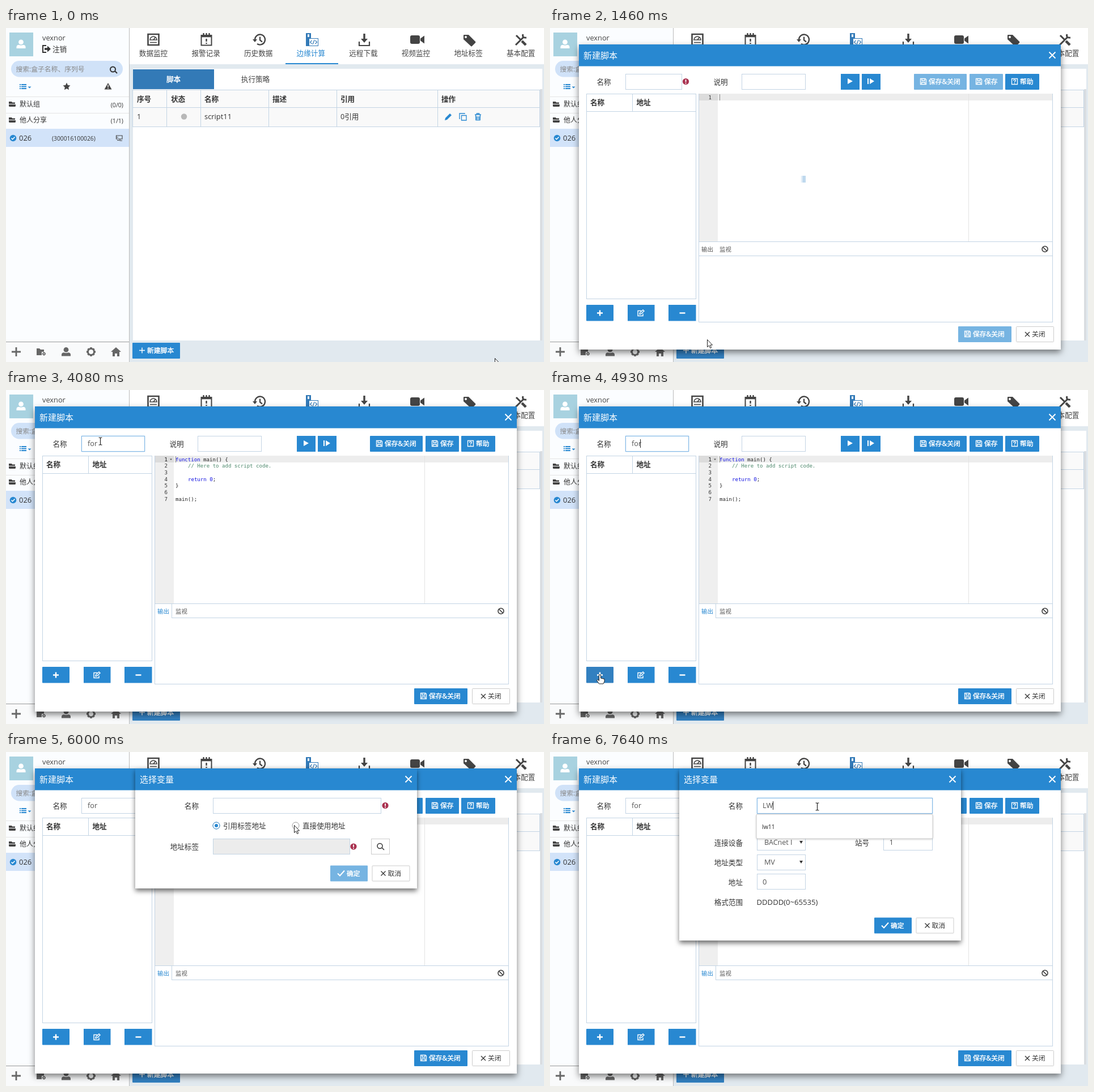
Write an HTML page that moves like this. It is 949x590 px and loops after 8 s.

```html
<!DOCTYPE html>
<html lang="zh-CN">
<head>
<meta charset="utf-8">
<title>新建脚本</title>
<style>
html, body { margin: 0; width: 100%; height: 100%; overflow: hidden; background: #fff; }
svg { display: block; font-family: "Open Sans", "Noto Sans CJK SC", "Noto Sans CJK", "Noto Sans", sans-serif; }
.mono { font-family: "DejaVu Sans Mono", monospace; }
.mid { text-anchor: middle; }
.end { text-anchor: end; }
.bold { font-weight: 700; }
.heavy { stroke: #fff; stroke-width: .4; }
</style>
</head>
<body>
<svg id="stage" width="949" height="590" viewBox="0 0 949 590"></svg>
<script>
const BLUE = '#2888d1', PALE = '#76b4e2', DARK = '#3280c0', EDGE = '#c3d4e4', INK = '#333', ICON = '#444';
const stage = document.getElementById('stage');

// Drawing helpers; each returns markup
const text = (x, y, s, fill = INK, size = 12.6, cls = '', id = '') =>
  `<text x="${x}" y="${y}" fill="${fill}" font-size="${size}" class="${cls}" id="${id}">${s}</text>`;
const rect = (x, y, w, h, fill, id = '', more = '') =>
  `<rect x="${x}" y="${y}" width="${w}" height="${h}" fill="${fill}" id="${id}" ${more}/>`;
const box = (x, y, w, h, fill = '#fff', line = EDGE, id = '', r = 0) =>
  rect(x + .5, y + .5, w - 1, h - 1, fill, id, `stroke="${line}" rx="${r}"`);
const path = (x, y, d, fill = 'none', line = 'none', w = 1.5) =>
  `<path transform="translate(${x} ${y})" d="${d}" fill="${fill}" stroke="${line}" stroke-width="${w}"/>`;
const stroke = (x, y, d, line = ICON, w = 1.5) => path(x, y, d, 'none', line, w);
const group = (id, body) => `<g id="${id}">${body}</g>`;
const disc = (x, y, r, fill) => `<circle cx="${x}" cy="${y}" r="${r}" fill="${fill}"/>`;

const CROSS = 'M-4-4L4 4M4-4L-4 4', PLUS = 'M-5 0H5M0-5V5', MINUS = 'M-5 0H5', CHECK = 'M-6 0L-2 4L6-5';
const LENS = 'M3 3L7 7M4 0A4.5 4.5 0 1 1-5 0A4.5 4.5 0 1 1 4 0';
const DISK = 'M-5-5H3.5L5-3.5V5H-5ZM-2.5-5V-1.5H2.5V-5M-3 5V1.5H3V5';
const PERSON = 'M0-8A4.3 4.3 0 0 1 0 .8A4.3 4.3 0 0 1 0-8M-8 7.5V5Q-8 1.5-3.5 1.2Q0 3 3.5 1.2Q8 1.5 8 5V7.5Z';
const FOLDER = 'M-6-4H-1L0-2.5H5V0H-6ZM-6 1H6V3.5Q6 5 4.5 5H-4.5Q-6 5-6 3.5Z';

const alertDot = (x, y, id) => group(id, disc(x, y, 5.6, '#a93250') +
  stroke(x, y, 'M0-3.5V1M0 2.2V4', '#fff', 1.8));
const button = (x, y, w, icon, label, fill = BLUE, id = '') => rect(x, y, w, 28, fill, id, 'rx="1"') +
  stroke(x + 16.5, y + 13.5, icon, '#fff', 1.3) + text(x + 26, y + 18.3, label, '#fff', 11.8, 'heavy');
const plainButton = (x, y, label) => box(x, y, 67, 28, '#fff', '#ccc', '', 1) +
  stroke(x + 20, y + 14, CROSS, INK, 1.3) + text(x + 28, y + 18.3, label, INK, 11.8);
const titleBar = (x, w, title) => rect(x, 29, w, 38.5, BLUE) + text(x + 8, 54, title, '#fff', 15) +
  stroke(x + w - 15, 48, 'M-5.5-5.5L5.5 5.5M5.5-5.5L-5.5 5.5', '#fff', 1.9);
const select = (y, label) => box(365, y, 86, 28) + text(378, y + 18.3, label, '#555') +
  path(443, y + 13, 'M-3-2H3L0 3Z', INK);

function sidebar() {
  const row = (y, name, count) => path(11, y - 5, FOLDER, ICON) + text(24, y, name, INK, 12) +
    text(207, y + 1, count, INK, 10.6, 'end');
  return rect(0, 0, 217, 590, '#fbfdff') + rect(6, 8, 42, 42, '#a8d2e0') + path(26.5, 28.5, PERSON, '#fff') +
    text(64, 21.5, 'vexnor', '#444', 12.8) +
    stroke(71, 37, 'M0-6H-6V6H0', INK, 2) + path(72, 37, 'M-4-1.7H1V-5.5L7 0L1 5.5V1.7H-4Z', INK) + text(82, 42, '注销') +
    rect(9, 58, 197, 28.5, '#d0e2f8', '', 'rx="14.2"') + text(17.5, 77, '搜索:盒子名称、序列号', '#888', 11.8) +
    stroke(189, 73, LENS, INK, 2) +
    stroke(30, 103.5, 'M-3-3.5H6M-3 0H6M-3 3.5H6M-6-3.5H-4M-6 0H-4M-6 3.5H-4', BLUE, 2) + path(41.5, 105, 'M-3-1.5H3L0 1.5Z', BLUE) +
    path(107, 103, 'M0-6.5L2-2L6.5-1.5L3.2 1.7L4 6.2L0 4L-4 6.2L-3.2 1.7L-6.5-1.5L-2-2Z', ICON) +
    path(180, 103, 'M0-6L6.5 5.5H-6.5Z', ICON) + stroke(180, 103, 'M0-2.5V1.5M0 2.7V4.2', '#fff') +
    rect(0, 121, 217, 1, '#e4e4e4') + row(139, '默认组', '(0/0)') + rect(0, 150, 217, 1, '#e4e4e4') + row(167, '他人分享', '(1/1)') +
    rect(0, 178, 217, 32, '#d2e3f9') + disc(12.5, 194.5, 5.8, BLUE) + stroke(12.5, 194.5, 'M-3 0L-1 2.2L3-2', '#fff', 1.6) +
    text(23, 199, '026', INK, 13) + text(81, 198.5, '(300016100026)', INK, 10.3) +
    stroke(200, 194, 'M-5.5-4H5V2H-5.5ZM-5.5-1H-2M1 2V5H5M-4 4.5H0', ICON, 1.1) +
    rect(0, 554, 217, 36, '#f9fafb') + rect(0, 554, 217, 1, '#999') +
    stroke(18, 572, 'M-8 0H8M0-8V8', '#666', 2.8) +
    path(61, 572, 'M-7-6H-2L0-4H6V0H2V6H-7Z', '#666') + stroke(67, 575.5, 'M2 0A2 2 0 1 1-2 0A2 2 0 1 1 2 0', '#666', 1.8) +
    path(106, 572, PERSON, '#666') +
    stroke(150, 572, 'M5.5 0A5.5 5.5 0 1 1-5.5 0A5.5 5.5 0 1 1 5.5 0', '#666', 3) +
    stroke(150, 572, 'M0-8V-5M0 5V8M-8 0H-5M5 0H8M-5.6-5.6L-4-4M4 4L5.6 5.6M5.6-5.6L4-4M-4 4L-5.6 5.6', '#666', 3.5) +
    path(194, 572, 'M0-8L9 0H6V8H2V3H-2V8H-6V0H-9Z', '#666') + rect(217, 0, 1, 590, '#bbb');
}

function navigation() {
  const names = ['数据监控', '报警记录', '历史数据', '边缘计算', '远程下载', '视频监控', '地址标签', '基本配置'];
  return rect(218, 0, 731, 64, '#fff') +
    names.map((s, i) => text(260 + i * 92.6, 49, s, i == 3 ? BLUE : ICON, 12.6, 'mid')).join('') +
    rect(493, 62, 93, 2, BLUE) +
    stroke(260, 20.5, 'M-9.5-9.5H9.5V9.5H-9.5Z', ICON, 2.6) +
    stroke(260, 20, 'M-6 1A6 6 0 0 1 6 1ZM0 1L3-3M-6 5.5H6', ICON, 1.7) +
    stroke(353.5, 21, 'M-9-8H9V9.5H-9Z', ICON, 2) + stroke(353.5, 20, 'M-9-5H9M-5-11V-5M0-11V-5M5-11V-5M0-1V4M0 6V8', ICON, 2.4) +
    stroke(448, 20.5, 'M-9 0A9 9 0 1 1-5 7.5M0-5V1L4 4', ICON, 2.3) + path(439, 21, 'M-4-1H4L0 4Z', ICON) +
    path(539, 20, 'M-10-11H-1V4H-3V12H-10Z', '#337ab7') + rect(532, 11, 3, 5, '#fff') +
    box(534, 18, 17, 14, '#fff', '#337ab7') + stroke(542.5, 25, 'M-3-3L-6 0L-3 3M3-3L6 0L3 3M1.5-4L-1.5 4', '#337ab7', 1.2) +
    stroke(632, 21, 'M-9 3V10H9V3', ICON, 2.2) + path(632, 21, 'M-1.7-11H1.7V-2H6L0 5L-6-2H-1.7Z', ICON) +
    rect(713, 13, 17, 15, ICON, '', 'rx="3"') + path(733, 20.5, 'M-2-2L5-7V7L-2 2Z', ICON) +
    path(817, 22, 'M-10-9Q-10-10-9-10H-1L11 2Q12 3 11 4L5 10Q4 11 3 10L-10-2ZM-6-8A2 2 0 0 0-6-4A2 2 0 0 0-6-8', ICON) +
    stroke(908, 21, 'M-9 9L5-5M-8-8L1 1', ICON, 3) + stroke(908, 21, 'M2 2L9 9', ICON, 4.5) +
    stroke(908, 21, 'M4-10Q2-3 10-4', ICON, 3);
}

function scriptPage() {
  const head = [[231, '序号'], [291, '状态'], [350, '名称'], [470, '描述'], [590, '引用'], [768, '操作']];
  return rect(218, 64, 731, 526, '#e1e9ef') + rect(224, 72, 722, 36, '#fff') + rect(224, 108, 718, 444, '#fff') +
    rect(942, 108, 4, 444, '#d9dde1') +
    rect(224, 73, 143, 35, '#337ab7') + text(295.5, 94.5, '脚本', '#fff', 12.6, 'mid bold') + text(440, 94.5, '执行策略', ICON, 12.6, 'mid') +
    box(223, 109, 719, 32, '#fafafa') + box(223, 140, 719, 35, '#f9f9f9') +
    [283, 343, 463, 583, 761].map(x => rect(x, 109, 1, 65, EDGE)).join('') +
    head.map(([x, s]) => text(x, 129.5, s, INK, 12.6, 'bold')).join('') +
    text(231, 161, '1', INK, 12.6) + disc(314, 156.5, 5.2, '#b8b8b8') + text(350, 161, 'script11', INK, 12.9) + text(590, 161, '0引用') +
    path(780, 157, 'M-6 6L-5 2L3-6L6-3L-2 5Z', BLUE) +
    stroke(806, 157, 'M-2.5-2.5H6V6H-2.5ZM-5 3H-6V-6H3V-5', BLUE, 1.3) +
    stroke(832.5, 157, 'M-5.5-4H5.5M-2-4V-6H2V-4M-4-3L-3.5 5.5H3.5L4-3M-1.5-1V4M1.5-1V4', BLUE, 1.6) +
    rect(223, 556, 84, 28, BLUE, 'create', 'rx="1"') + stroke(240, 569.5, PLUS, '#fff', 1.4) + text(249, 574, '新建脚本', '#fff', 11.8, 'heavy');
}

function editor() {
  const line = (n, s, x = 299, fill = '#222') => text(285, 113.9 + n * 11.67, n, INK, 9.07, 'mono end') +
    text(x, 113.9 + n * 11.67, s, fill, 9.07, 'mono');
  const key = s => `<tspan fill="#1010e0">${s}</tspan>`;
  return box(262, 116, 625, 404) + rect(263, 116, 33, 261, '#efefef') + rect(263, 116, 33, 12, '#dcdcdc') +
    rect(296, 116, 590, 12, '#ededed') + rect(738, 116, 1, 261, '#e4e4e4') + rect(299, 117, 1, 11, '#888') +
    line(1, '') +
    group('code', path(291, 122.5, 'M-2-1H2L0 1.5Z', '#555') + line(1, key('function') + ' main() {') +
      line(2, '// Here to add script code.', 321, '#4c886b') + line(3, '') +
      line(4, key('return') + ' ' + key('0') + ';', 321) + line(5, '}') + line(6, '') + line(7, 'main();')) +
    rect(262, 377, 625, 1, EDGE) + rect(262, 402, 625, 1, EDGE) +
    group('tab', rect(263, 402, 29, 1, '#fff') + rect(292, 378, 1, 24, EDGE)) +
    text(267, 394.5, '输出', '#555', 10.4, '', 'output') + text(299, 394.5, '监视', '#555', 10.4) +
    stroke(873, 390.5, 'M5 0A5 5 0 1 1-5 0A5 5 0 1 1 5 0M-3.5-3.5L3.5 3.5', INK, 1.5);
}

function scriptDialog() {
  return rect(51, 29, 850, 539, '#fff', '', 'filter="url(#wide)"') + titleBar(51, 850, '新建脚本') +
    text(82.5, 99.5, '名称') + box(133, 81, 100, 28, '#fff', EDGE, 'name1') + text(144, 99.3, '', '#555', 12.7, '', 'value1') + alertDot(239.5, 94.5, 'alert1') +
    rect(0, 87, 1, 15, '#222', 'caret1') + text(288.5, 99.5, '说明') + box(338, 81, 113, 28) +
    rect(513, 81, 33, 28, BLUE) + path(529, 94, 'M-4-5L5 0L-4 5Z', '#fff') +
    rect(550, 81, 33, 28, BLUE) + path(566, 94, 'M-6-5H-4V5H-6ZM-2-5L6 0L-2 5Z', '#fff') +
    button(642, 81, 93, DISK, '保存&amp;关闭', PALE, 'save1') + button(740, 81, 59, DISK, '保存', PALE, 'save2') +
    button(803, 81, 60, 'M-5-5H5V5H-5ZM-2-1.5Q-2-3 0-3Q2-3 2-1.5Q2-.5 0 .5V1.5M0 2.5V3.7', '帮助') +
    box(64, 116, 194, 363) + rect(64, 147, 193, 1, EDGE) + rect(145, 116, 1, 31, EDGE) +
    text(71, 136.3, '名称', INK, 12.6, 'bold') + text(152.5, 136.3, '地址', INK, 12.6, 'bold') +
    rect(64, 489, 48, 28.5, BLUE, 'add', 'rx="1"') + stroke(88, 503.5, PLUS, '#fff', 2.4) +
    rect(137, 489, 47.5, 28.5, BLUE) + stroke(160, 503.5, 'M1-4H-5V5H4V1M-2 2L-1.5-.5L4-5.5L6-3.5L.5 1.5Z', '#fff', 1.4) +
    rect(209, 489, 48.5, 28.5, BLUE) + stroke(233.5, 503.5, MINUS, '#fff', 2.4) +
    editor() + button(720, 527, 94, DISK, '保存&amp;关闭', PALE, 'save3') + plainButton(822, 527, '关闭');
}

function variableDialog() {
  const radio = (x, s, id) => `<circle cx="${x}" cy="130" r="6" fill="#fff" stroke="#999"/>` +
    group(id, `<circle cx="${x}" cy="130" r="6" fill="#fff" stroke="${BLUE}"/>` + disc(x, 130, 3, BLUE)) + text(x + 12, 134.5, s, INK, 12.6);
  const label = (y, s) => text(340, y, s, INK, 12.6, 'end');
  return rect(228, 29, 497, 212, '#fff', 'panel', 'filter="url(#near)"') + titleBar(228, 497, '选择变量') +
    label(99.5, '名称') + box(365, 81, 297, 28, '#fff', EDGE, 'name2') + text(375, 99.3, '', '#555', 12.9, '', 'value2') + alertDot(669, 94.5, 'alert2') +
    rect(0, 87, 1, 15, '#222', 'caret2') + radio(371, '引用标签地址', 'byTag') + radio(511, '直接使用地址', 'direct') +
    group('tagForm', label(172, '地址标签') + box(365, 153, 242, 28, '#ececec') + alertDot(613, 167, '') +
      box(644, 153, 33, 28, '#fff', '#ccc') + stroke(660, 166, LENS, INK, 1.5)) +
    group('directForm', label(164.5, '连接设备') + select(146, 'BACnet I') + text(538, 164.5, '站号') + box(588, 146, 87, 28) + text(598.5, 164.3, '1', '#555', 12.9) +
      label(199.5, '地址类型') + select(181, 'MV') + label(234.5, '地址') + box(365, 215, 86, 28) + text(375, 233.5, '0', '#555', 12.9) +
      label(269.5, '格式范围') + text(364.5, 269.5, 'DDDDD(0~65535)', INK, 13.1)) +
    group('footer', rect(572, 200.5, 66, 28, PALE, 'ok', 'rx="1"') + stroke(591, 214.5, CHECK, '#fff', 2) +
      text(601, 218.8, '确定', '#fff', 11.8, 'heavy') + plainButton(645.5, 200.5, '取消'));
}

const dropdown = (id, x, w, items) => group(id, rect(x, 110, w, items.length * 30 + 13, '#fff', '', 'rx="2" stroke="#c8c8c8" filter="url(#soft)"') +
  items.map((s, i) => text(x + 10, 135.7 + i * 30, s, '#222', 10.4)).join(''));
const shadow = (id, dy, blur, alpha) => `<filter id="${id}" x="-20%" y="-20%" width="140%" height="150%">
  <feDropShadow dx="0" dy="${dy}" stdDeviation="${blur}" flood-opacity="${alpha}"/></filter>`;

stage.innerHTML = shadow('wide', 5, 6, .5) + shadow('near', 4.5, 4, .55) + shadow('soft', 1, 1.5, .2) +
  scriptPage() + navigation() + sidebar() + group('dialog1', scriptDialog()) +
  group('loader', rect(443, 261, 1, 12, '#cfe2f3') + rect(445, 261, 6, 12, '#bfd9ee') +
    group('moreBars', [461, 477, 493].map(x => rect(x, 261, 6, 12, '#bfd9ee')).join(''))) +
  group('dialog2', variableDialog()) + dropdown('list1', 132, 101, ['script11', 'modbus']) + dropdown('list2', 364, 311, ['lw11']) +
  group('arrow', path(0, 0, 'M.5.5V13.5L3.5 10.8L5.6 15.5L7.7 14.6L5.6 10H9.5Z', '#fff', '#222', 1)) +
  group('beam', stroke(0, 0, 'M-3-6.5H-1L0-5.5L1-6.5H3M0-5.5V5.5M-3 6.5H-1L0 5.5L1 6.5H3', '#222', 1.2)) +
  group('hand', path(0, 0, 'M-1.5 0H1.5V6L8 7.5V12L6 16H-1.5L-5.5 10L-4 8.5L-1.5 10.5Z', '#fff', '#222', 1));

const el = id => document.getElementById(id);
const show = (id, on) => { el(id).style.display = on ? '' : 'none'; };
const set = (id, name, value) => el(id).setAttribute(name, value);

// Pointer moves: start, end, steps, target x, target y
const MOVES = [[70, 370, 5, 583, 369], [540, 1160, 9, 272, 566], [1310, 1460, 2, 277, 550], [1540, 2230, 10, 166, 90],
  [4390, 4930, 8, 88, 503], [5160, 5240, 2, 110, 464], [5320, 6000, 10, 508, 129], [6250, 6480, 4, 471, 96]];
function pointer(t) {
  let x = 862, y = 583;
  for (const [start, end, steps, tx, ty] of MOVES) {
    if (t < start) break;
    const p = Math.min(1, (Math.floor((t - start) / (end - start) * (steps - 1) + 1e-6) + 1) / steps);
    const k = p * p * (3 - 2 * p);
    x += (tx - x) * k;
    y += (ty - y) * k;
  }
  return [x, y];
}

// Keys: time and text in the field from then on, the first entry being the focus
function field(n, t, keys, blur, width, carets) {
  const i = keys.filter(k => t >= k[0]).length - 1, focused = i >= 0 && t < blur;
  const color = i > 0 ? '#7db6e6' : '#a33a3a';
  el('value' + n).textContent = i < 0 ? '' : keys[i][1];
  set('name' + n, 'stroke', focused ? color : EDGE);
  set('name' + n, 'width', width[i > 0 ? 1 : 0] - 1);
  el('name' + n).style.filter = focused ? `drop-shadow(0 0 1px ${color}80)` : '';
  show('alert' + n, i < 1);
  show('caret' + n, focused && (t - keys[i][0]) % 1060 < 530);
  if (i >= 0) set('caret' + n, 'x', carets[i]);
  return i > 0;
}

function draw(t) {
  const [x, y] = pointer(t), within = (l, r, a, b) => x > l && x < r && y > a && y < b;
  const second = t >= 5240, direct = t >= 6250, loaded = t >= 1620;
  const overCreate = t < 1460 && within(223, 307, 556, 584);
  const overAdd = t > 4390 && !second && within(64, 112, 489, 518);
  const overField = t > 1460 && (second ? within(365, 662, 81, 109) : within(133, 245, 81, 109));

  show('dialog1', t >= 1460);
  show('code', loaded);
  show('tab', loaded);
  set('output', 'fill', loaded ? BLUE : '#555');
  show('loader', t >= 1460 && t < 1540 || t >= 5090 && !second);
  show('moreBars', t > 5000);
  set('create', 'fill', overCreate || t >= 1310 ? DARK : BLUE);
  set('add', 'fill', overAdd ? DARK : BLUE);

  const named = field(1, t, [[2310, ''], [3070, 'f'], [3380, 'fo'], [3550, 'for']], 5090, [100, 112], [144, 148, 156, 159]);
  for (const id of ['save1', 'save2', 'save3']) set(id, 'fill', named ? BLUE : PALE);
  show('list1', t >= 2390 && t < 3070);

  show('dialog2', second);
  set('panel', 'height', direct ? 304 : 212);
  set('footer', 'transform', `translate(0 ${direct ? 92 : 0})`);
  show('byTag', !direct);
  show('direct', direct);
  show('tagForm', !direct);
  show('directForm', direct);
  set('ok', 'fill', field(2, t, [[6650, ''], [7490, 'L'], [7640, 'LW']], 8000, [297, 310], [376, 382, 393]) ? BLUE : PALE);
  show('list2', t >= 6710);

  const shape = overField ? 'beam' : overCreate || overAdd ? 'hand' : 'arrow';
  for (const id of ['arrow', 'beam', 'hand']) show(id, id == shape);
  const half = shape == 'beam' ? .5 : 0;
  set(shape, 'transform', `translate(${Math.round(x) + half} ${Math.round(y) + half})`);
}

function tick() {
  draw(performance.now() % 8000);
  requestAnimationFrame(tick);
}
tick();
</script>
</body>
</html>
```
